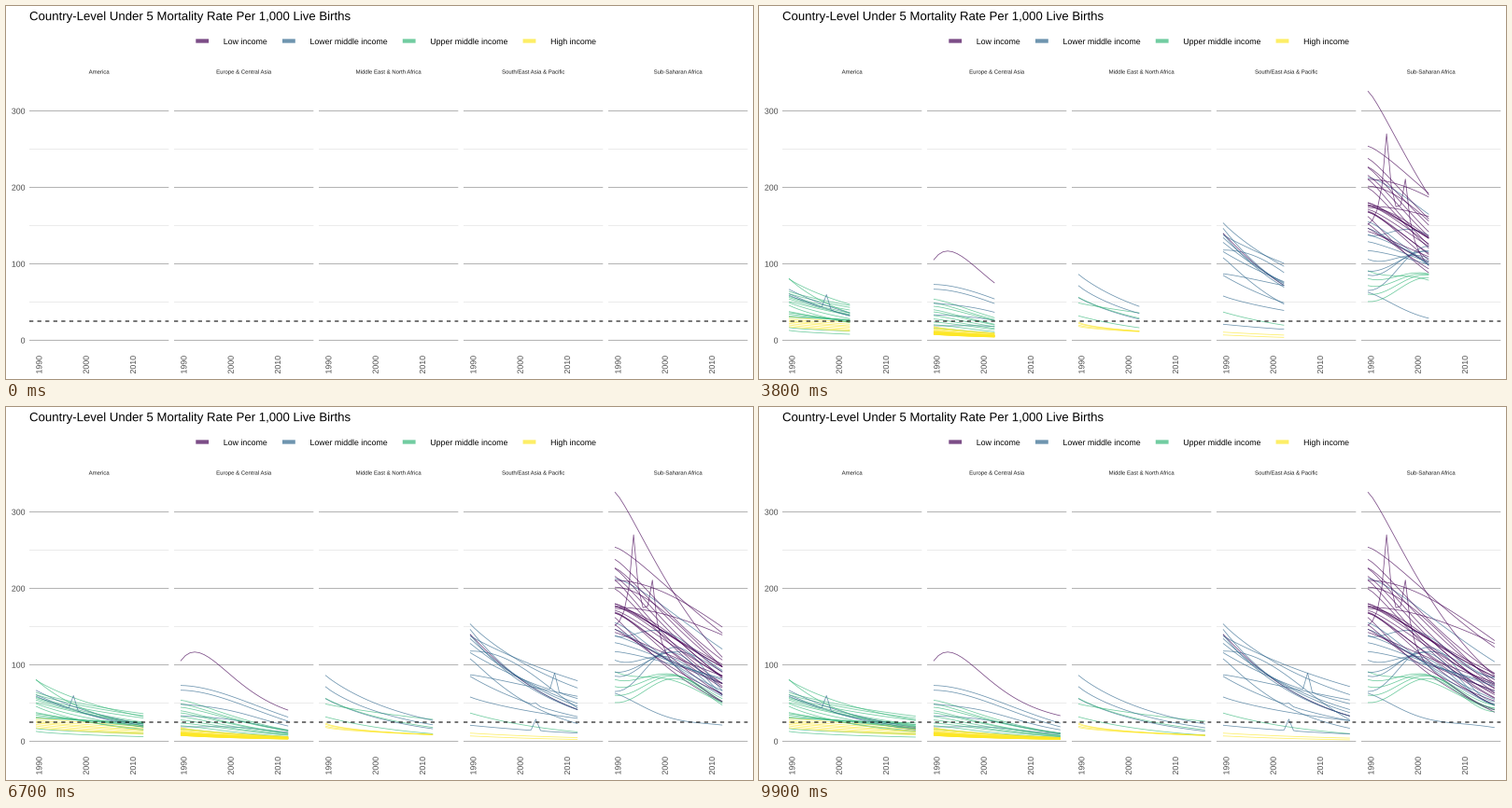
Animation, 800 px wide and 400 px high, one loop 10 s. Source, as a matplotlib script:

```python
import numpy as np
import matplotlib.pyplot as plt
from matplotlib.animation import FuncAnimation
from matplotlib.collections import LineCollection
from matplotlib.patches import PathPatch
from matplotlib.textpath import TextPath
from matplotlib.transforms import Affine2D

plt.rcParams["font.family"] = "Liberation Sans"

W, H, DPI = 800, 400, 100
PX = 72 / DPI                      # points per pixel
FRAMES, REVEAL = 100, 79           # the rest of the loop is a pause
LEFT, PITCH, PANEL_W, PAD = 25, 155, 149.3, 7
YEAR_W, BASE, UNIT = 5.03, 358.5, 0.82
LAST = 27
YEARS = np.arange(LAST + 1)

REGIONS = ["America", "Europe & Central Asia", "Middle East & North Africa",
           "South/East Asia & Pacific", "Sub-Saharan Africa"]
INCOMES = ["Low income", "Lower middle income", "Upper middle income", "High income"]
COLORS = ["#440154", "#31688E", "#35B779", "#FDE725"]
LOW, LOWER, UPPER, HIGH = range(4)
AMERICA, EUROPE, MIDEAST, ASIA, AFRICA = range(5)
ALPHA = 0.7

rng = np.random.default_rng(5)
series = []                        # (panel, income, yearly values)


def curve(start, end, bend=1, hump=0, skew=1):
    """Exponential fall; bend > 1 delays it, hump lifts the middle years."""
    s = YEARS / LAST
    return (start * (end / start) ** s ** bend
            * (1 + hump * np.sin(np.pi * s ** skew) ** 2))


def line(panel, income, start, end, bend=1, hump=0, skew=1, peaks=(), width=0.3):
    vals = curve(start, end, bend, hump, skew)
    for year, height in peaks:
        vals = vals + height * np.exp(-abs(YEARS - year) / width)
    series.append((panel, income, vals))


def band(panel, income, n, starts, ends, bend=1, humps=(0, 0)):
    """n similar lines spread over a range of starts and ends."""
    for a, b, h in zip(*(np.linspace(*r, n) for r in (starts, ends, humps))):
        line(panel, income, a * rng.uniform(0.98, 1.02), b * rng.uniform(0.92, 1.08),
             bend + rng.uniform(-0.08, 0.08), h)


band(AMERICA, UPPER, 2, (80, 81), (15, 30), 0.95)
band(AMERICA, UPPER, 8, (46, 63), (13, 31))
band(AMERICA, UPPER, 5, (30, 38), (26, 14))
band(AMERICA, UPPER, 2, (13, 17), (5.5, 9), 0.8)
band(AMERICA, LOWER, 2, (60, 67), (15, 17))
line(AMERICA, LOWER, 59, 17, peaks=[(8, 19)])
band(AMERICA, HIGH, 7, (18, 30), (8, 17), 0.9)

line(EUROPE, LOW, 105, 33.5, hump=0.35, skew=0.5)
band(EUROPE, LOWER, 2, (66, 72), (20, 24), 1.8)
band(EUROPE, LOWER, 3, (19, 48), (9, 14), 1.5, (0.2, 0.1))
band(EUROPE, UPPER, 10, (16, 53), (4, 11), 1.3)
band(EUROPE, HIGH, 8, (11.5, 18), (4, 5), 0.9)
band(EUROPE, HIGH, 20, (7.5, 11.5), (2.5, 4), 0.9)

band(MIDEAST, LOWER, 3, (56, 85), (13, 24), 0.9)
band(MIDEAST, UPPER, 2, (49, 56), (25, 15))
line(MIDEAST, UPPER, 32, 8)
band(MIDEAST, HIGH, 4, (18, 24), (7.5, 8), 0.75)

line(ASIA, LOW, 140, 33, 1.05)
band(ASIA, LOWER, 2, (139, 154), (77, 66))
band(ASIA, LOWER, 4, (126, 144), (44, 32), 1.05)
line(ASIA, LOWER, 118, 28, 2.2)
line(ASIA, LOWER, 108, 17, 1.1)
line(ASIA, LOWER, 87, 54, 1.2)
line(ASIA, LOWER, 58, 27, 0.9)
line(ASIA, LOWER, 116, 49, peaks=[(18, 24)])
line(ASIA, LOWER, 85, 27, peaks=[(14, 3)])
line(ASIA, LOWER, 21, 9.5, peaks=[(14, 15)])
line(ASIA, UPPER, 37, 10)
band(ASIA, HIGH, 2, (7, 10.5), (2, 4.5))

line(AFRICA, LOW, 326, 86, 1.23)
line(AFRICA, LOW, 254, 123, 1.3)
band(AFRICA, LOW, 6, (202, 238), (58, 88), 1.2)
band(AFRICA, LOW, 2, (175, 212), (122, 124), 1.9)
band(AFRICA, LOW, 8, (166, 181), (50, 95), 1.3)
band(AFRICA, LOW, 2, (176, 199), (60, 82), 1.9)
band(AFRICA, LOW, 4, (145, 159), (72, 42), 1.1)
line(AFRICA, LOW, 145, 38, 1.6, peaks=[(4, 130), (8, 85)], width=1.3)
line(AFRICA, LOWER, 213, 104, 1.4)
band(AFRICA, LOWER, 5, (117, 155), (78, 50), 1.3)
line(AFRICA, LOWER, 138, 82, hump=0.28, skew=0.85)
line(AFRICA, LOWER, 90, 84, hump=0.35)
band(AFRICA, LOWER, 3, (66, 104), (54, 46), 1, (1.1, 0.45))
line(AFRICA, LOWER, 63, 18, 1.1, hump=-0.2)
band(AFRICA, UPPER, 5, (51, 92), (38, 46), 1, (0.85, 0.25))
rng.shuffle(series)


def to_y(value):
    return BASE - UNIT * value


def text(x, y, s, px, color="black", align=0, angle=0):
    """Text as an outline with its baseline at y; align runs 0 (left) to 1 (right)."""
    path = TextPath((0, 0), s, size=px)
    place = (Affine2D().translate(-align * path.get_extents().x1, 0).scale(1, -1)
             .rotate_deg(-angle).translate(x, y))
    ax.add_patch(PathPatch(path, transform=place + ax.transData,
                           facecolor=color, lw=0, snap=False))


def rule(x0, x1, y, px, color, **kw):
    ax.plot([x0, x1], [y, y], color=color, lw=px * PX, snap=False,
            solid_capstyle="butt", dash_capstyle="butt", **kw)


fig = plt.figure(figsize=(W / DPI, H / DPI), dpi=DPI, facecolor="white")
ax = fig.add_axes([0, 0, 1, 1])
ax.set_xlim(0, W)
ax.set_ylim(H, 0)
ax.axis("off")

text(25, 15.2, "Country-Level Under 5 Mortality Rate Per 1,000 Live Births", 13.2)

for x, label, color in zip((203.3, 296, 424.8, 553.6), INCOMES, COLORS):
    rule(x, x + 13.8, 37.5, 4.3, color, alpha=ALPHA)
    text(x + 29.5, 41, label, 8.8)

for v in (0, 100, 200, 300):
    text(20.2, to_y(v) + 3.2, str(v), 8.8, "#4D4D4D", align=1)

for p, region in enumerate(REGIONS):
    x0 = LEFT + p * PITCH
    x1 = x0 + PANEL_W
    text((x0 + x1) / 2, 72.6, region, 6, "#1A1A1A", align=0.5)
    for v in range(0, 301, 50):
        rule(x0, x1, to_y(v), 1, "#EBEBEB" if v % 100 else "#B3B3B3", zorder=1)
    rule(x0, x1, to_y(25), 1.07, "black", zorder=3, dashes=(4, 4))
    for year in (0, 10, 20):
        text(x0 + PAD + year * YEAR_W + 6.4, 384.9, str(1990 + year), 8.8, "#4D4D4D",
             align=0.5, angle=90)

curves = LineCollection([], colors=[COLORS[c] for _, c, _ in series],
                        alpha=ALPHA, linewidths=0.78 * PX, capstyle="butt", zorder=2)
ax.add_collection(curves, autolim=False)


def update(frame):
    now = LAST * min(frame / REVEAL, 1)
    years = np.append(YEARS[YEARS < now], now)
    curves.set_segments([
        np.column_stack([LEFT + PAD + p * PITCH + years * YEAR_W,
                         to_y(np.interp(years, YEARS, vals))])
        for p, _, vals in series])
    return [curves]


anim = FuncAnimation(fig, update, frames=FRAMES, interval=100,
                     repeat=True, repeat_delay=0, blit=False)
plt.show()
```
